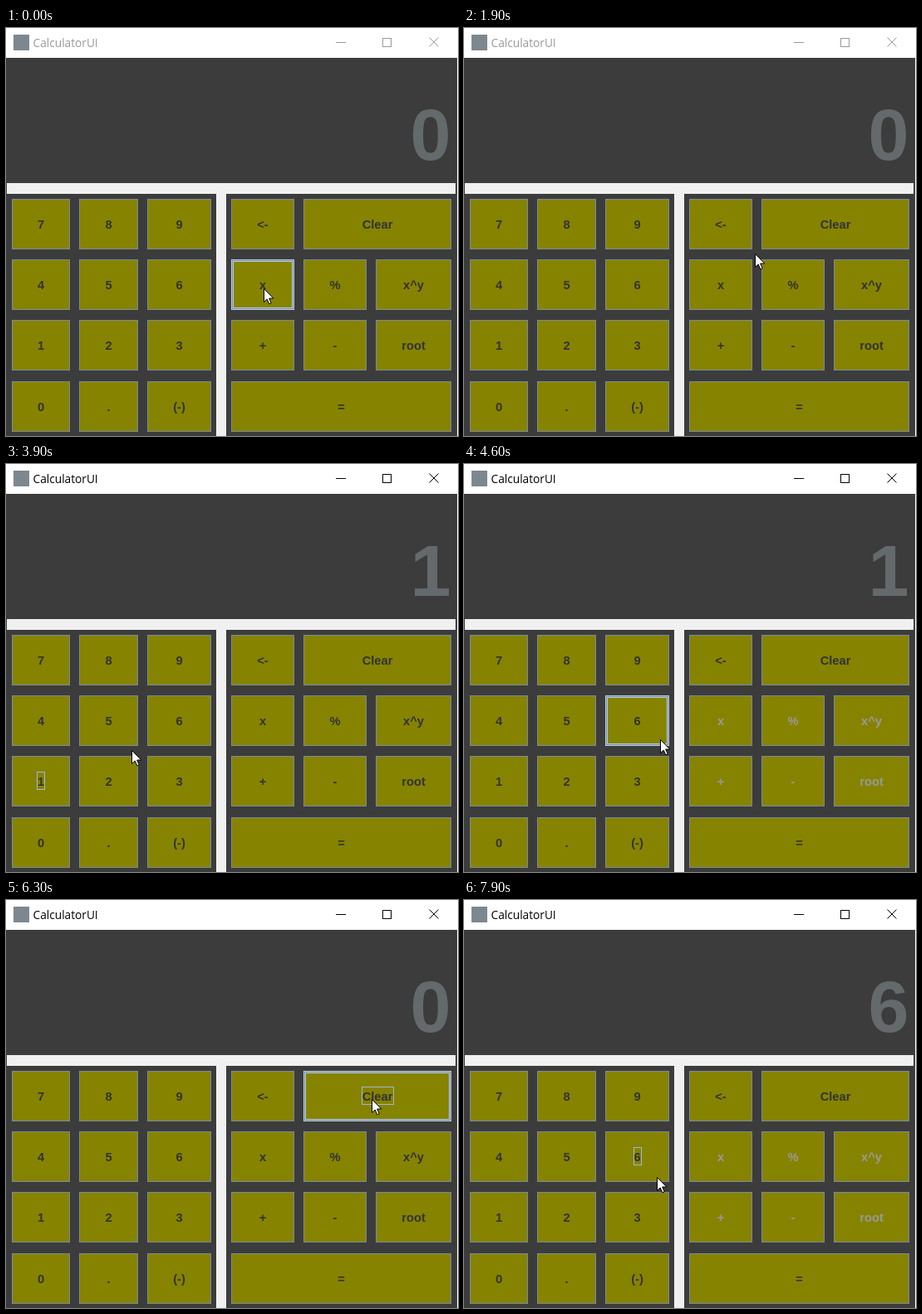
Animation of 544 by 492 pixels, one loop 8000 ms. Source, as an HTML page with a canvas:

```html
<!DOCTYPE html>
<html lang="en">
<head>
<meta charset="utf-8">
<title>CalculatorUI</title>
<style>
html, body { margin: 0; width: 100%; height: 100%; overflow: hidden; background: #fff; }
canvas { display: block; }
</style>
</head>
<body>
<canvas id="stage" width="544" height="492"></canvas>
<script>
const g = document.getElementById('stage').getContext('2d');
const LOOP = 8000, STEP = 100;
const DARK = '#3c3c3c', OLIVE = '#868300', EDGE = '#7a8a99', LIGHT = '#b8cfe5', FOCUS = '#a3b8cc';
const OPERATORS = ['x', '%', 'x^y', '+', '-', 'root'];

// Columns are [left, width]
const ROWS = [206, 279, 352, 426], HEIGHT = 61;
const PAD = [[7, 70], [88, 71], [170, 77]];
const SIDE = [[271, 76], [358, 76], [445, 91]];
const buttons = [];
const addRow = (row, cols, labels) => labels.forEach((label, i) =>
  buttons.push({ label, x: cols[i][0], y: ROWS[row], w: cols[i][1], h: HEIGHT }));

['789', '456', '123'].forEach((digits, row) => addRow(row, PAD, [...digits]));
addRow(3, PAD, ['0', '.', '(-)']);
addRow(0, [SIDE[0], [358, 178]], ['<-', 'Clear']);
addRow(1, SIDE, OPERATORS.slice(0, 3));
addRow(2, SIDE, OPERATORS.slice(3));
addRow(3, [[271, 265]], ['=']);

// Each click holds the button for one step and acts on release
const clicks = [[3300, '1'], [4300, '+'], [4800, '6'], [5300, '='],
  [6200, 'Clear'], [6900, '3'], [7400, '+'], [7800, '6']];

// Pointer stops: time, x, y
const path = [
  [0, 310, 314], [900, 310, 314], [1900, 350, 272], [2800, 138, 348],
  [3200, 52, 386], [3450, 52, 386], [3900, 151, 345], [4200, 306, 384],
  [4400, 306, 384], [4700, 212, 314], [4900, 212, 314], [5200, 371, 441],
  [5450, 371, 441], [6100, 440, 240], [6350, 440, 240], [6800, 222, 363],
  [7100, 222, 363], [7350, 312, 384], [7500, 312, 384], [7750, 222, 322],
  [7800, 222, 322], [7900, 232, 334], [8000, 250, 350]];

function pointerAt(t) {
  const i = path.findIndex(p => p[0] > t);
  const [t0, x0, y0] = path[i - 1], [t1, x1, y1] = path[i];
  const u = (t - t0) / (t1 - t0), k = u * u * (3 - 2 * u);
  return [Math.round(x0 + (x1 - x0) * k), Math.round(y0 + (y1 - y0) * k)];
}

function stateAt(t) {
  const s = { value: '0', stored: 0, focus: null, pressed: null, locked: false, active: t >= clicks[0][0] };
  for (const [time, key] of clicks) {
    if (t < time) break;
    s.focus = key;
    if (t < time + STEP) {
      s.pressed = key;
      break;
    }
    if (key === '+') {
      s.stored = +s.value;
      s.locked = true;
      s.focus = null;
    } else if (key === '=') {
      s.value = String(s.stored + +s.value);
      s.locked = false;
    } else if (key === 'Clear') {
      s.value = '0';
      s.locked = false;
    } else {
      s.value = key;
    }
  }
  return s;
}

function fill(color, x, y, w, h) {
  g.fillStyle = color;
  g.fillRect(x, y, w, h);
}

function frame(color, x, y, w, h) {
  g.strokeStyle = color;
  g.lineWidth = 1;
  g.strokeRect(x + .5, y + .5, w - 1, h - 1);
}

function text(str, x, y, font, color, align) {
  g.font = font;
  g.fillStyle = color;
  g.textAlign = align;
  g.fillText(str, x, y);
}

function drawTitle(active) {
  const ink = active ? '#000' : '#999';
  fill('#7d8790', 9, 8, 19, 19);
  text('CalculatorUI', 32.5, 23, '13.7px "Open Sans", "Noto Sans", sans-serif', ink, 'left');
  fill(ink, 397, 17, 12, 1);
  frame(ink, 453, 12, 11, 11);
  g.beginPath();
  g.moveTo(509.5, 11.5);
  g.lineTo(520.5, 22.5);
  g.moveTo(520.5, 11.5);
  g.lineTo(509.5, 22.5);
  g.stroke();
}

function drawButton({ label, x, y, w, h }, state, [px, py]) {
  const pressed = state.pressed === label;
  const off = state.locked && OPERATORS.includes(label);
  // Rollover begins only once the pointer is well inside
  const inset = 7;
  const hover = !off && px > x + inset && px < x + w - inset && py > y + inset && py < y + h - inset;

  fill(pressed ? LIGHT : OLIVE, x, y, w, h);
  frame(EDGE, x, y, w, h);
  if (pressed) {
    fill(EDGE, x + 1, y + 1, w - 2, 1);
    fill(EDGE, x + 1, y + 1, 1, h - 2);
  } else if (hover) {
    frame(LIGHT, x, y, w, h);
    frame(EDGE, x + 1, y + 1, w - 2, h - 2);
    frame(LIGHT, x + 2, y + 2, w - 4, h - 4);
  }

  const cx = x + w / 2;
  text(label, cx, y + 36, 'bold 14.7px "Liberation Sans", Arial, sans-serif', off ? '#999' : '#333', 'center');
  if (state.focus === label) {
    const tw = Math.round(g.measureText(label).width) + 2;
    frame(FOCUS, Math.round(cx - tw / 2), y + 19, tw, 22);
  }
}

const arrow = new Path2D('M.5 .5V16.5L4.2 13L6.8 18.8L9.2 17.8L6.7 12H11.8Z');
function drawPointer([x, y]) {
  g.save();
  g.translate(x, y);
  g.fillStyle = '#fff';
  g.strokeStyle = '#000';
  g.fill(arrow);
  g.stroke(arrow);
  g.restore();
}

function draw(now) {
  const t = Math.floor(now % LOOP / STEP) * STEP;
  const state = stateAt(t), pointer = pointerAt(t);
  fill('#fff', 0, 0, 544, 492);
  drawTitle(state.active);
  fill(DARK, 0, 36, 543, 456);
  fill('#f0f0f0', 1, 187, 540, 13);
  fill('#f0f0f0', 253, 187, 12, 305);
  text(state.value, 535.5, 159, 'bold 88px "Liberation Sans", Arial, sans-serif', '#64696c', 'right');
  buttons.forEach(b => drawButton(b, state, pointer));
  drawPointer(pointer);
}

const start = performance.now();
function tick() {
  draw(performance.now() - start);
  requestAnimationFrame(tick);
}
tick();
</script>
</body>
</html>
```
